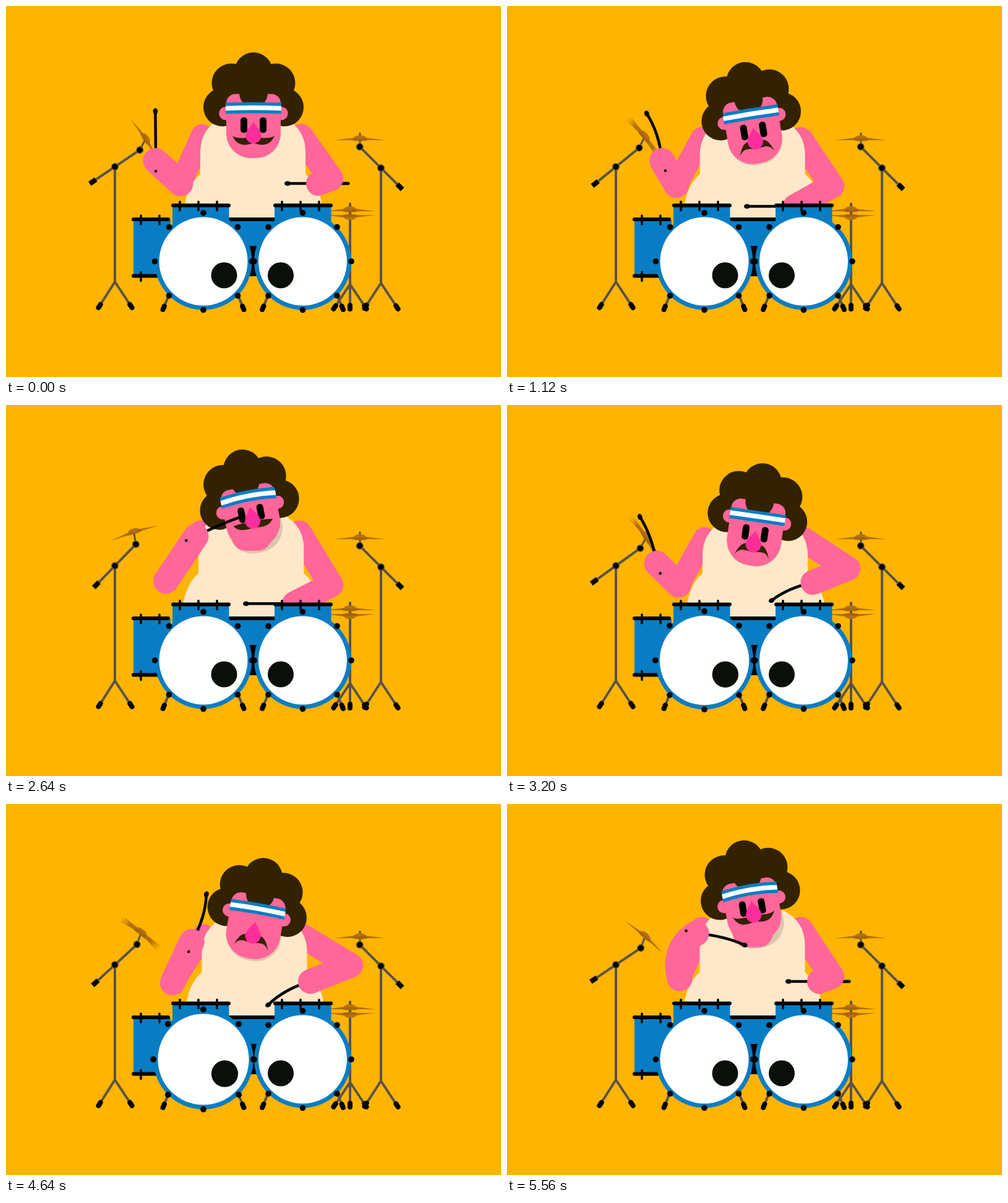
An HTML page with a canvas that plays this animation: 800 px wide and 600 px high, repeating every 5600 ms.

```html
<!DOCTYPE html>
<html lang="en">
<head>
<meta charset="utf-8">
<title>Drummer</title>
<style>
  html, body { margin: 0; width: 100%; height: 100%; overflow: hidden; background: #ffb400; }
  canvas { display: block; }
</style>
</head>
<body>
<canvas id="stage" width="800" height="600"></canvas>
<script>
const c = document.getElementById('stage').getContext('2d');
const LOOP = 5600, BAR = 1400, NOD = 700, STROKE = 350, CRASH = 1400;
const STICK = 98, TAU = Math.PI * 2, RAD = Math.PI / 180;
const BLUE = '#087dc4', SKIN = '#ff6699', HAIR = '#332200', CREAM = '#ffe8c9',
      STEEL = '#5a5249', BRASS = '#b5700f', BLACK = '#000', PUPIL = '#0a0f0a';

// ---- timing helpers
const mix = (a, b, u) => a + (b - a) * u;
function ramp(t, a, b) {
  const u = Math.min(1, Math.max(0, (t - a) / (b - a)));
  return u * u * (3 - 2 * u);
}
const hold = (t, a, b, d, e) => ramp(t, a, b) * (1 - ramp(t, d, e));
// like hold, but centred on the wrap of a 0..1 cycle
const strike = (v, a, b, d, e) => v > .5 ? ramp(v, a, b) : 1 - ramp(v, d, e);

// how far the head is bowed in one nod: quick drop, slower recovery
function bowAt(u) {
  u %= 1;
  if (u > .94) u -= 1;
  return u < .31 ? Math.sin(Math.PI / 2 * (u + .06) / .37) : (1 - (u - .31) / .63) ** 1.5;
}

// ---- poses
function headPose(t) {
  const bar = t % BAR, u = t % NOD / NOD;
  const bow = bowAt(u), pitch = bowAt(u + .02);
  const lean = hold(u, .31, .7, .93, 1);
  const tilt = (bar < NOD ? 1 : -1) * 11 * lean;
  return {
    bow, pitch, tilt,
    x: 400 + tilt * .5, y: 157 + 65 * bow,
    hair: -6 - 50 * (pitch - bow),
    smile: 1 - 2 * hold(u, .05, .25, .63, .85),
    open: 1 - hold(bar, 400, 430, 450, 500),
    shade: 12 * lean * Math.max(0, 1 - 2 * bow),
    dx: 3 + tilt * .25, top: 172 + 35 * bow
  };
}

function leftPose(t, bow) {
  const v = t % STROKE / STROKE, wave = Math.sin(TAU * v);
  const hit = strike(v, .88, 1, .18, .28);
  const rest = 20 + 85 * ramp(v, .2, .85);
  return {
    ex: 270 + 12 * Math.cos(TAU * v), ey: 282 + 20 * bow,
    hx: mix(307, 242, hit), hy: mix(208, 242, hit) + 32 * bow,
    whip: hold(v, .55, .65, .9, 1),
    angle: mix(rest, -25 * wave, hit), bend: -10 * wave,
    boom: -45.8 + 11.8 * strike(v, .74, .88, .08, .35),
    tilt: -18 + 74 * strike(v, .74, .95, .15, .5),
    blur: 6 * wave
  };
}

function rightPose(t, bow) {
  const bar = t % BAR;
  const reach = hold(t, CRASH, CRASH + 90, CRASH + 240, CRASH + 440);
  const smash = hold(t, CRASH + 120, CRASH + 160, CRASH + 220, CRASH + 280);
  const raise = Math.max(hold(bar, 440, 600, 640, 740), reach);
  const out = Math.max(hold(bar, 300, 440, 640, 740), reach);
  const down = (hold(bar, 700, 800, 1250, 1350) + hold(bar, 150, 230, 300, 400)) * (1 - reach);
  return {
    ex: 525 + 32 * out + 2 * raise + 8 * smash, ey: 279 + 12 * down - 18 * out - 16 * raise,
    hx: 505 - 13 * out * (1 - raise) + 45 * raise - 39 * down + 42 * smash,
    hy: 287 - 125 * raise + (33 + 10 * bow) * down + 28 * smash,
    angle: -90 - 29 * out * (1 - raise) + 104 * raise + 80 * smash,
    grip: 50 + 28 * Math.max(down, out), bend: -10 * out * (1 - raise) - 4 * raise, raise
  };
}

// ---- drawing helpers
function line(color, width, ...p) {
  c.beginPath();
  for (let i = 0; i < p.length; i += 2) c.lineTo(p[i], p[i + 1]);
  c.strokeStyle = color; c.lineWidth = width; c.stroke();
}
function curve(color, width, x0, y0, cx, cy, x1, y1) {
  c.beginPath(); c.moveTo(x0, y0); c.quadraticCurveTo(cx, cy, x1, y1);
  c.strokeStyle = color; c.lineWidth = width; c.stroke();
}
function disc(color, x, y, rx, ry = rx) {
  c.beginPath(); c.ellipse(x, y, rx, ry, 0, 0, TAU);
  c.fillStyle = color; c.fill();
}
function box(color, x, y, w, h, r = 0) {
  c.beginPath(); c.roundRect(x, y, w, h, r);
  c.fillStyle = color; c.fill();
}
function shape(color, d) {
  c.fillStyle = color; c.fill(new Path2D(d));
}
function placed(x, y, deg, draw) {
  c.save(); c.translate(x, y); c.rotate(deg * RAD); draw(); c.restore();
}

// ---- stands
function leg(x0, y0, x1, y1) {
  line(STEEL, 4, x0, y0, x1, y1);
  const n = Math.hypot(x1 - x0, y1 - y0), ux = (x1 - x0) / n, uy = (y1 - y0) / n;
  line(BLACK, 8, x1 - ux * 5, y1 - uy * 5, x1 + ux, y1 + uy);
}
function joint(x, y) {
  disc(STEEL, x, y, 6);
  disc(BLACK, x, y, 4.5);
}
function cymbal(x, y, deg) {
  placed(x, y, deg, () => {
    shape(BRASS, 'M-41 3L-10-1Q-7-5 0-5Q7-5 10-1L41 3Z');
    shape('#a5650c', 'M-13 3Q0 6 13 3L10 0H-10Z');
  });
}
function boom() {
  c.lineCap = 'butt';
  line(STEEL, 4, -37, 0, 48, 0);
  line(BLACK, 8, -49, 0, -37, 0);
  c.lineCap = 'round';
  joint(48.5, 0);
}

function leftStand({ boom: deg, tilt, blur }) {
  const x = 176 + 48.5 * Math.cos(deg * RAD), y = 260 + 48.5 * Math.sin(deg * RAD);
  line(STEEL, 4, 176, 260, 176, 446);
  leg(176, 446, 150, 487); leg(176, 446, 203, 487);
  placed(176, 260, deg, boom);
  joint(176, 260);
  placed(x, y, tilt / 2, () => {
    line(STEEL, 3, 0, -6, 0, -18);
    if (blur > 1) for (const k of [-1, 1]) cymbal(0, -21, tilt / 2 + k * blur);
    cymbal(0, -21, tilt / 2);
  });
}

function rightStand(swing) {
  line(STEEL, 4, 606, 262, 606, 448);
  leg(606, 448, 580, 488); leg(606, 448, 633, 489);
  placed(606, 262, swing * 6, () => {
    line(STEEL, 3, -34, -34, -34, -56);
    placed(0, 0, -135, boom);
    cymbal(-34, -48, swing * 24);
  });
  joint(606, 262);
}

function hiHat() {
  line(STEEL, 4, 556, 320, 556, 488);
  for (const x of [530, 556, 582]) leg(556, 450, x, 489);
  cymbal(556, 329, 0);
  cymbal(556, 341, 180);
}

// ---- drummer
function torsoPath({ dx, top }) {
  const l = 311 + dx, r = 481 + dx;
  return `M${l} 272V${top + 55}Q${l} ${top + 18} ${l + 34} ${top}H${r - 34}Q${r} ${top + 18} ${r} ${top + 55}V272` +
    `C${r + 14} 284 ${r + 24} 302 ${r + 27} 322V350H${l - 25}V322C${l - 22} 302 ${l - 14} 284 ${l} 272Z`;
}
function neckPath({ dx, top }) {
  const x = 397 + dx / 2, b = top + 59;
  return `M${x - 34} ${top - 20}V${b - 30}Q${x - 32} ${b} ${x - 8} ${b}H${x + 8}Q${x + 32} ${b} ${x + 34} ${b - 30}V${top - 20}Z`;
}

function body(h) {
  const torso = torsoPath(h), neck = neckPath(h);
  shape(CREAM, torso);
  shape(SKIN, neck);
  c.save();
  c.clip(new Path2D(torso + neck));
  placed(h.x + h.shade * .4, h.y + h.shade, h.tilt, () => face('rgba(0,0,0,.14)', h.pitch));
  c.restore();
}

function face(color, pitch) {
  const top = -36 + 13 * pitch;
  box(color, -44, top, 88, 62 + 30 * pitch - top, [15, 15, 40, 40]);
}

function mustache(y, s) {
  const w = 31 + 3 * s, tip = s > 0 ? -7 * s : -12 * s;
  for (const k of [-1, 1])
    shape(HAIR, `M0 ${y - 2}C${k * 9} ${y - 8 + 2 * s} ${k * (w - 9)} ${y - 7 + 7 * s} ${k * w} ${y + tip}` +
      `C${k * (w - 7)} ${y + 5 + 4 * s} ${k * 16} ${y + 6 + 4 * s} 0 ${y + 5}Z`);
}

function head({ x, y, tilt, hair, pitch, smile, open }) {
  const rise = 60 - 7 * pitch, band = -20 + 46 * pitch ** 1.3, arch = -5 + 12 * pitch;
  const eye = 5 + 41 * pitch, nose = 15 + 62 * pitch, lock = -24 + 42 * pitch;
  placed(x, y, tilt, () => {
    disc(HAIR, 0, hair - rise, 31);
    for (const k of [-1, 1]) {
      disc(HAIR, k * 36, hair - rise * .68, 31.5);
      disc(HAIR, k * 50, hair, 31);
      disc(SKIN, k * 45, 0, 10.5);
    }
    disc(HAIR, 0, hair - 20, 50);
    for (const k of [-1, 1]) disc(SKIN, k * 45, 0, 10.5);
    face(SKIN, pitch);
    box(HAIR, -23, -52, 46, lock + 52, [0, 0, 23, 23]);
    c.save();
    c.beginPath(); c.rect(-45, -90, 90, 200); c.clip();
    for (const [color, w] of [[BLUE, 18], ['#fff', 7.5]])
      curve(color, w, -48, band - arch / 2, 0, band + arch * 1.5, 48, band - arch / 2);
    c.restore();
    if (open > .1)
      for (const k of [-1, 1]) box(BLACK, k * 15.5 - 5.5, eye - 12.5 * open, 11, 25 * open, 5);
    mustache(20 + 68 * pitch, smile);
    shape('#ff2d9b', `M0 ${nose - 23}C4 ${nose - 15} 12.5 ${nose - 8} 12.5 ${nose}` +
      `A12.5 12.5 0 0 1-12.5 ${nose}C-12.5 ${nose - 8}-4 ${nose - 15} 0 ${nose - 23}Z`);
  });
}

// stick held at a hand; angle 0 points up, clockwise positive
function stick({ hx, hy, angle, bend }, grip) {
  placed(hx, hy, angle, () => {
    line(BLACK, 5, 0, STICK - grip, 0, 0);
    curve(BLACK, 4.5, 0, 0, -bend, -grip * .55, 0, -grip);
    disc(BLACK, 0, -grip, 3.8, 5);
  });
}

function upperArms(l, r, { dx, top }) {
  line(SKIN, 36, 314 + dx, top + 28, l.ex, l.ey);
  line(SKIN, 40, 474 + dx, top + 30, r.ex, r.ey);
}

function leftForearm(p) {
  const { ex, ey, hx, hy, whip } = p;
  stick(p, 80);
  curve(SKIN, 41, ex, ey, (ex + hx) / 2 - 26 * whip, (ey + hy) / 2 - 12 * whip, hx, hy);
  placed(hx, hy, p.angle, () => box(BLACK, -2, 15, 4, 4));
}

function rightForearm(p) {
  const { ex, ey, hx, hy, raise } = p;
  stick(p, p.grip);
  line(SKIN, 40, ex, ey, hx, hy);
  if (raise > .5) { disc(SKIN, hx - 11, hy - 13, 8); disc(SKIN, hx + 8, hy - 12, 9); }
}

// ---- drums
function rim(x0, x1, y, ticks) {
  line(BLACK, 6, x0, y, x1, y);
  for (const x of ticks) line(BLACK, 3.5, x, y - 6, x, y + 8);
}

function kick(x, look, pulse) {
  for (const k of [-1, 1]) leg(x + k * 56, 468, x + k * 65, 490);
  placed(x, 413, 0, () => {
    c.scale(1 + pulse * .03, 1 + pulse * .03);
    disc(BLUE, 0, 0, 78.5);
    disc('#fff', 0, 0, 71.5);
    disc(PUPIL, look, 22.5, 21);
    for (let a = 0; a < TAU; a += TAU / 8) disc(BLACK, 78.5 * Math.cos(a), 78.5 * Math.sin(a), 4.8);
  });
}

function tom(x) {
  box(BLUE, x, 323, 91.5, 50);
  return () => rim(x + 1, x + 91, 322.5, [x + 12, x + 42, x + 72]);
}

function drums(bar, quiet, bow) {
  box(BLUE, 206, 346, 60, 90);
  rim(206, 262, 345, [218, 248]);
  rim(206, 250, 436.5, [218]);
  box(BLUE, 355, 346, 85, 88);
  line(BLACK, 6, 362, 345, 436, 345);
  box(BLACK, 390, 388, 18, 49);
  if (bow > .9) box(CREAM, 390, 395, 18, 8);
  const rims = [269, 434].map(tom);
  const beat = (...times) => quiet ? 0 : Math.max(0, ...times.map(t => 1 - Math.abs(bar - t) / 60));
  kick(319, 33.5, beat(440, 600));
  kick(479.5, -35.5, beat(180, 280, 720));
  rims.forEach(draw => draw());
}

function draw(t) {
  const h = headPose(t), l = leftPose(t, h.bow), r = rightPose(t, h.bow);
  // the crash keeps rocking a little after it is struck
  const since = t - CRASH - 160;
  const swing = since > 0 && since < 420 ? Math.exp(-since / 150) * Math.cos(since / 32) : 0;

  c.fillStyle = '#ffb400';
  c.fillRect(0, 0, 800, 600);
  c.lineCap = c.lineJoin = 'round';
  leftStand(l);
  upperArms(l, r, h);
  body(h);
  head(h);
  rightForearm(r);
  leftForearm(l);
  hiHat();
  rightStand(swing);
  drums(t % BAR, t > 3640 && t < 4200, h.bow);
}

const start = performance.now();
function frame() {
  draw((performance.now() - start) % LOOP);
  requestAnimationFrame(frame);
}
frame();
</script>
</body>
</html>
```
